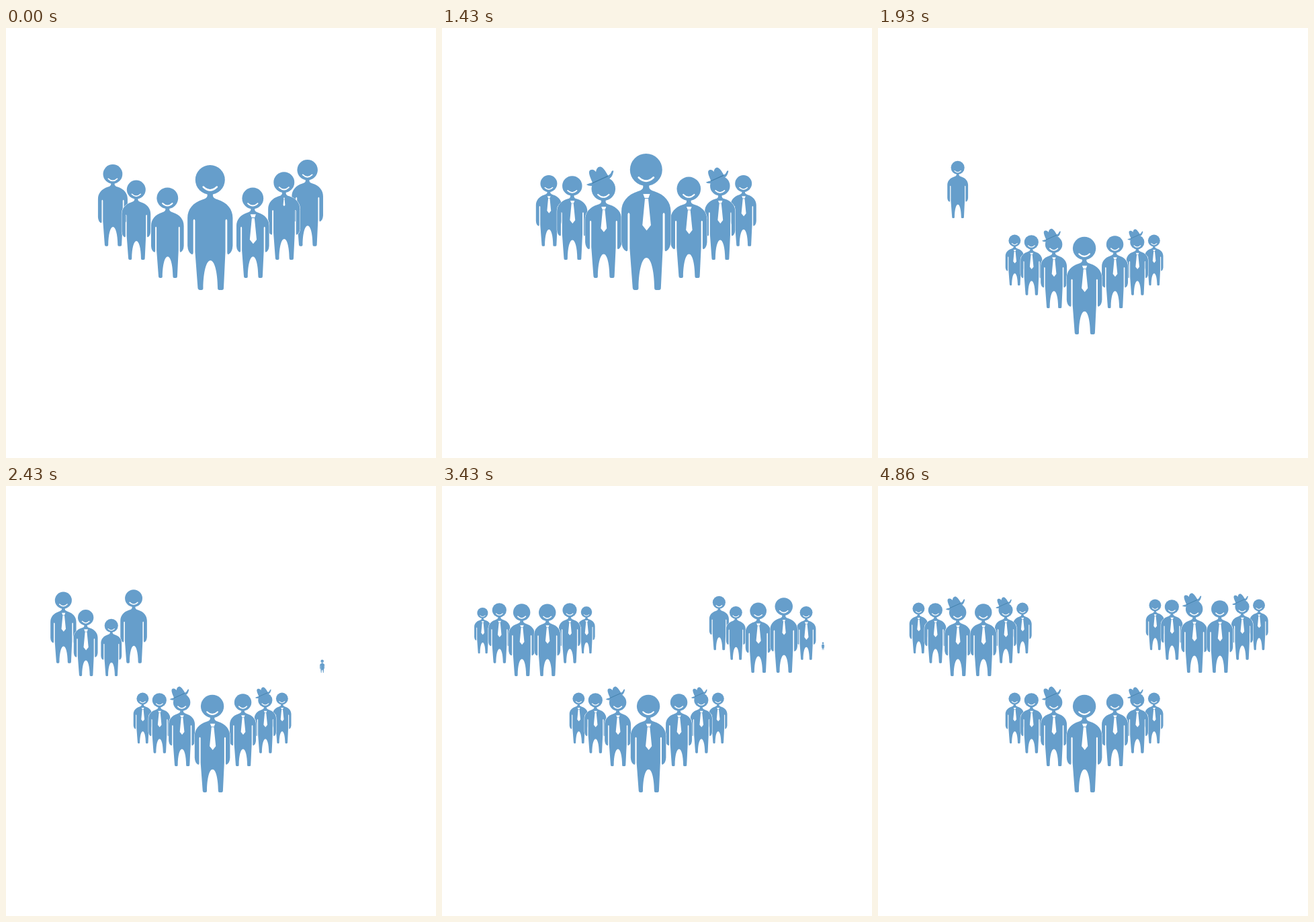
An HTML page with a canvas that plays this animation: 640 px wide and 640 px high, repeating every 7.5 s.

```html
<!DOCTYPE html>
<html lang="en">
<head>
<meta charset="utf-8">
<title>Teams</title>
<style>
  html, body { margin: 0; width: 100%; height: 100%; overflow: hidden; background: #fff; }
  canvas { display: block; width: 640px; height: 640px; }
</style>
</head>
<body>
<canvas id="stage" width="640" height="640"></canvas>
<script>
const ctx = document.getElementById('stage').getContext('2d');
const BLUE = '#669ecb', DARK = '#427fab';
const LOOP = 7500, STEP = 1000 / 14, LAST = 68;

// Figure parts: the feet stand on (0,0), the full height is 203
const body = new Path2D(
  'M-4.5 -158 V-153 Q-5 -149 -12 -147 C-28 -142 -36.7 -131 -36.7 -117 V-72' +
  'Q-36 -61 -30 -58 Q-27.4 -57 -27.4 -61 V-113 Q-26 -117 -24.4 -113 V-62' +
  'L-20 -3 Q-19.5 0 -17 0 H-14 Q-11.3 0 -11.3 -3 C-11 -30 -6 -48 .5 -48' +
  'C7 -48 12 -30 12.3 -3 Q12.3 0 15 0 H19 Q22 0 22 -3 L24.8 -62 V-113' +
  'Q26.4 -117 27.8 -113 V-61 Q27.8 -57 30 -58 Q36 -61 36.7 -72 V-117' +
  'C36.7 -131 28 -142 12 -147 Q5 -149 4.5 -153 V-158 Z');
const head = new Path2D();
head.arc(0, -179, 24, 0, 7);
const smile = new Path2D('M-11 -167.5 Q0 -157 11 -167.5');
const tie = new Path2D('M-4.5 -143 H5.8 L3.6 -137 H-2.2 Z M-1.8 -136 H3.2 L7.2 -96 L.8 -88 L-5.6 -96 Z');
const hat = new Path2D(
  'M-34 -188 Q-28 -191 -22 -192 C-26 -202 -32 -214 -26 -217 C-21 -219 -18 -217 -15 -213' +
  'C-14 -220 -10 -225 -4 -222.5 C2 -219 5 -212 9 -206 Q14 -208 16 -214 Q18 -217 20 -215' +
  'C18 -205 15 -201 10 -199 L-20 -186 Q-29 -184 -34 -188 Z');
const band = new Path2D('M-22 -191 L8 -204.5');

const ease = p => (1 - Math.cos(Math.PI * Math.min(1, Math.max(0, p)))) / 2;
const mix = (a, b, p) => a + (b - a) * p;

// Grow, overshoot, dip, settle
function pop(age) {
  if (age <= 0) return 0;
  if (age < 350) return 1.23 * ease(age / 350);
  if (age < 790) return mix(1.23, .89, ease((age - 350) / 440));
  return mix(.89, 1, ease((age - 790) / 460));
}

// Seats are side and row (L0 is front left), C is the leader.
// Bodies and ties appear seat by seat in the given orders.
const evenly = (first, gap) => i => first + gap * i;
const beats = [0, 3.6, 4.5, 7, 11.5, 14.1];
const onBeat = first => i => first + STEP * beats[i];
const sideOrder = 'L0 L1 R1 R0 L2 R2';
const SMALL = .716;

const crews = [
  {
    place: () => ({ x: 137.7, y: 283, zoom: SMALL }), gap: 26.6,
    order: sideOrder, born: onBeat(1721),
    tieOrder: 'L0 L1 R0 R1 L2 R2', tied: evenly(1950, 235), hatted: 3570
  },
  {
    place: () => ({ x: 489.7, y: 278, zoom: SMALL }), gap: 26.6,
    order: sideOrder, born: onBeat(2341),
    tieOrder: 'L0 R1 R0 L1 L2 R2', tied: evenly(2870, 180), hatted: 3570
  },
  {
    place(t) {
      const p = ease((t - 1430) / 410);
      return { x: mix(303.8, 307.1, p), y: mix(372, 417, p), zoom: mix(1, SMALL, p) };
    },
    gap: 63.5,
    order: 'C L0 R0 L1 R1 L2 R2', born: evenly(-940, 90),
    tieOrder: 'R0 R1 L1 C L0 L2 R2', tied: evenly(-320, 195), hatted: 820
  }
];

function scaled(x, y, s, draw) {
  if (s <= 0) return;
  ctx.save();
  ctx.translate(x, y);
  ctx.scale(s, s);
  draw();
  ctx.restore();
}

function person(x, y, s, tieSize, hatSize) {
  scaled(x, y, s, () => {
    ctx.fillStyle = BLUE;
    ctx.strokeStyle = '#fff';
    ctx.lineWidth = Math.min(1 / s, 2.5);
    ctx.stroke(body);
    ctx.fill(body);
    ctx.fill(head);
    ctx.lineCap = 'round';
    ctx.lineWidth = 2.8;
    ctx.stroke(smile);
    scaled(0, -143, tieSize, () => {
      ctx.translate(0, 143);
      ctx.fillStyle = '#fff';
      ctx.fill(tie);
    });
    scaled(-8, -221, hatSize, () => {
      ctx.translate(8, 221);
      ctx.fillStyle = BLUE;
      ctx.fill(hat);
      ctx.strokeStyle = DARK;
      ctx.lineWidth = 1.8;
      ctx.stroke(band);
    });
  });
}

function drawCrew(crew, t) {
  const { x, y, zoom } = crew.place(t);
  const order = crew.order.split(' '), tieOrder = crew.tieOrder.split(' ');
  for (const seat of ['L2', 'R2', 'L1', 'R1', 'L0', 'R0', 'C']) {
    const turn = order.indexOf(seat);
    if (turn < 0) continue;
    const size = zoom * pop(t - crew.born(turn));
    const tieSize = pop(t - crew.tied(tieOrder.indexOf(seat)));
    const hatSize = seat === 'L0' || seat === 'R1' ? pop(t - crew.hatted) : 0;
    if (seat === 'C') {
      const step = 18 + 36.6 * ease((t - 1430) / 280);
      person(x, y + zoom * step, size, tieSize, 0);
    } else {
      const depth = 4 * (1 - .75 ** seat[1]);
      const side = seat[0] === 'L' ? -1 : 1;
      person(x + side * zoom * (crew.gap + 46.5 * depth), y - zoom * 27 * depth,
        size * (.741 - .126 * depth), tieSize, hatSize);
    }
  }
}

function draw(now) {
  const n = Math.floor((now % LOOP + 5) / STEP) % 105;
  const t = n >= LAST ? LOOP : n * STEP;
  ctx.clearRect(0, 0, 640, 640);
  for (const crew of crews) drawCrew(crew, t);
}

let start;
function tick(now) {
  start ??= now;
  draw(now - start);
  requestAnimationFrame(tick);
}
draw(0);
requestAnimationFrame(tick);
</script>
</body>
</html>
```
